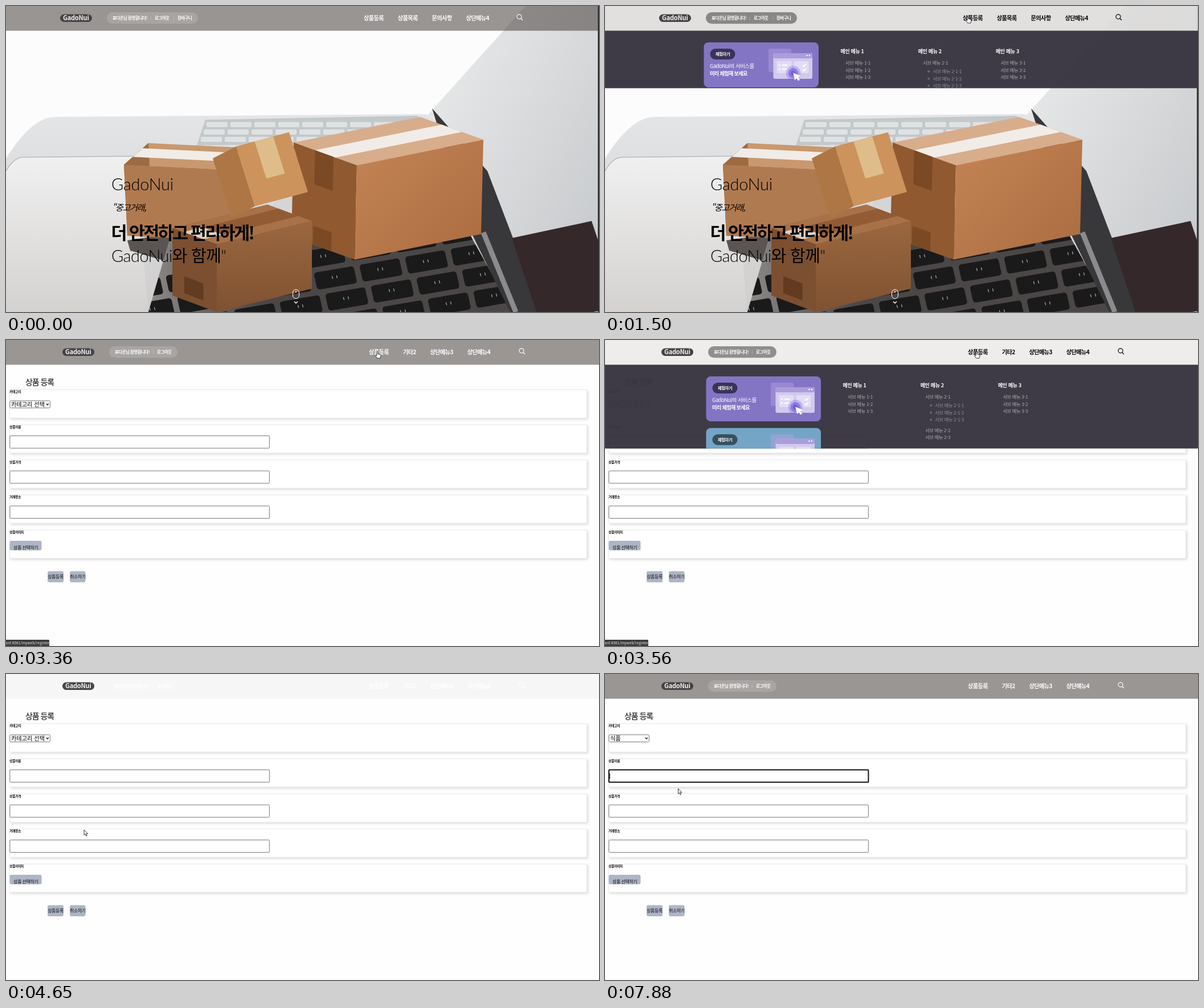
Recreate the animation shown at these times as an HTML page. Size 1041x538 px, loop 8000 ms.

```html
<!DOCTYPE html>
<html lang="ko">
<head>
<meta charset="utf-8">
<title>Shop demo</title>
<style>
  html, body { margin: 0; width: 100%; height: 100%; overflow: hidden; background: #fefefe; }
  svg { display: block; width: 1041px; height: 538px; font-family: "Noto Sans CJK KR", "Noto Sans KR", "Noto Sans CJK", sans-serif; }
  text { white-space: pre; }
  .light { font-family: Lato, "Noto Sans CJK KR", "Noto Sans CJK", sans-serif; }
  .card { filter: drop-shadow(2px 2px 2px rgba(0, 0, 0, .14)); }
  .list { filter: drop-shadow(1px 1px 2px rgba(0, 0, 0, .35)); }
</style>
</head>
<body>
<svg id="stage" viewBox="0 0 1041 538" xmlns="http://www.w3.org/2000/svg"></svg>
<script>
const LOOP = 8000, PAGE_SWAP = 3210;
const BRAND = 'GadoNui', USER = '표다온';

// Drawing helpers
const text = (x, y, s, size, { w = 400, fill = '#000', ls = 0, extra = '' } = {}) =>
  `<text x="${x}" y="${y}" font-size="${size}" font-weight="${w}" fill="${fill}" letter-spacing="${ls}" ${extra}>${s}</text>`;
const rect = (x, y, w, h, fill, r = 0, extra = '') =>
  `<rect x="${x}" y="${y}" width="${w}" height="${h}" rx="${r}" fill="${fill}" ${extra}/>`;
const path = (d, fill, extra = '') => `<path d="${d}" fill="${fill}" ${extra}/>`;
const line = (d, color, width = 1) => path(d, 'none', `stroke="${color}" stroke-width="${width}"`);
const dot = (x, y, r, fill, extra = '') => `<circle cx="${x}" cy="${y}" r="${r}" fill="${fill}" ${extra}/>`;
const each = (n, fn) => Array.from({ length: n }, (_, i) => fn(i)).join('');
const gradient = (id, from, to, dir) =>
  `<linearGradient id="${id}" ${dir}><stop stop-color="${from}"/><stop offset="1" stop-color="${to}"/></linearGradient>`;

// Part of the parallelogram at p spanned by u and v, cut to fractions of both
const facet = ([x, y], u, v, fill, [u0, u1] = [0, 1], [v0, v1] = [0, 1]) => {
  const at = (a, b) => `${x + u[0] * a + v[0] * b} ${y + u[1] * a + v[1] * b}`;
  return path(`M${at(u0, v0)}L${at(u1, v0)}L${at(u1, v1)}L${at(u0, v1)}Z`, fill);
};

// A carton seen from its near top corner, with edges to the left, to the right and down
const carton = (corner, left, right, down, [top, dark, front], tapes) => {
  const face = { top: [left, right], left: [left, down], right: [right, down] };
  return facet(corner, ...face.top, top) + facet(corner, ...face.left, dark) + facet(corner, ...face.right, front)
    + tapes.map(([side, fill, u, v]) => facet(corner, ...face[side], fill, u, v)).join('');
};

const DOWN = 'x1="0" y1="0" x2="0" y2="1"';
const ACROSS = 'x1="0" y1="0" x2="1" y2="1"';
const SIDE = 'x1="0" y1="0" x2=".3" y2="0"';
const PLATE = 'M290 400L250 538H890L805 385L600 360Z';
const TAPE = '#f1ece7', FULL = [0, 1];

const defs = `<defs>
  ${gradient('screen', '#eceded', '#c3c6c9', ACROSS)}
  ${gradient('base', '#e3e5e7', '#cfcdcc', DOWN)}
  ${gradient('corner', '#f0f0f0', '#d4d2d0', DOWN)}
  ${gradient('metal', '#8d8987', '#4b4746', SIDE)}
  ${gradient('bigFront', '#c48455', '#aa6c40', ACROSS)}
  ${gradient('frontSide', '#9a673f', '#805232', DOWN)}
  <clipPath id="plate"><path d="${PLATE}"/></clipPath>
  <clipPath id="dropClip"><rect id="dropRect" x="0" y="43" width="1041" height="0"/></clipPath>
</defs>`;

const keys = each(4, r => each(9, c => {
  const x = 200 + c * 80 + r * 20, y = 488 - c * 14 + r * 37;
  return `<g transform="matrix(1 -.17 .22 1 ${x} ${y})">${rect(0, 0, 70, 30, '#1b1a1b', 5)}
    ${line('M30 11v5M38 11v5', '#c9c7c7')}</g>`;
}));

const photo = `
  ${rect(0, 0, 1041, 538, '#fcfcfc')}
  ${path('M912 0H1041V538H900L738 194Z', 'url(#screen)')}
  ${path('M0 268Q45 196 85 195L738 190L900 538H0Z', 'url(#base)')}
  ${path('M0 290Q14 266 30 266L225 264L250 538H0Z', 'url(#corner)')}
  ${line('M0 290Q14 266 30 266L225 264', '#a3a5a6', 1.2)}
  ${path('M350 200L722 193L760 240L335 245Z', '#c3c8ca')}
  ${each(3, r => each(9, c => rect(352 + c * 42 - r * 5, 204 + r * 13, 37, 9, '#dfe2e3', 2)))}
  ${path('M213 412L295 400L285 450L218 430Z', '#5a5452')}
  ${path(PLATE, 'url(#metal)')}
  <g clip-path="url(#plate)">${keys}</g>
  ${path('M470 330H510V385L470 375Z', '#d5d5d5')}
  ${path('M748 180L845 290L890 408L935 538H885L815 395Z', '#38373a')}
  ${line('M838 398L895 538', '#8b8b8e', 9)}
  ${facet([888, 408], [140, -30], [50, 150], '#34282a')}
  ${carton([207, 279], [43, -38], [185, 9], [6, 125], ['#c9986f', '#9d6a42', '#b07a50'],
    [['top', TAPE, [.36, .76], [0, .95]]])}
  ${carton([616, 280], [-111, -40], [222, -45], [-4, 166], ['#d8ad8c', '#90592f', 'url(#bigFront)'],
    [['top', TAPE, [.34, .66], FULL], ['left', '#7b4924', [.37, .66], [0, .36]], ['left', '#7b4924', [.37, .66], [.8, 1]]])}
  ${carton([370, 419], [-78, -29], [167, -41], [0, 119], ['#a87147', '#7b4f30', 'url(#frontSide)'],
    [['top', '#925b34', [.3, .75], FULL], ['top', '#dcd1c6', [.3, .75], [0, .2]], ['left', '#623b21', [.3, .73], [.65, .9]]])}
  ${carton([404, 247], [-41, 21], [93, -25], [33, 105], ['#c98f58', '#ad7644', '#cd935c'],
    [['right', '#dfbd8b', [.35, .7], [0, .62]]])}`;

const home = `<g id="home">${photo}
  ${text(185, 324, BRAND, 29, { w: 300, ls: -.3, extra: 'class="light"' })}
  ${text(186, 360, '"중고거래,', 15, { w: 300, ls: -1.2, extra: 'font-style="italic"' })}
  ${text(184.5, 410, '더 안전하고 편리하게!', 30.5, { w: 700, ls: -2.6 })}
  ${text(185, 449.5, BRAND + '와 함께"', 29, { w: 300, ls: -.6, extra: 'class="light"' })}
  ${rect(503.5, 498.5, 11, 16, 'none', 5.5, 'stroke="#fff"')}
  <g id="scrollHint">${line('M509 501.5v2', '#fff', 2)}${line('M506 519.5l3 3l3-3', '#fff', 1.5)}</g>
  ${rect(1039, 0, 2, 538, '#2d2d30')}</g>`;

// Registration form
const FIELDS = ['카테고리', '상품이름', '상품가격', '거래장소', '상품이미지'];
const OPTIONS = ['카테고리 선택', '생활용품', '식품', '패션의류잡화', '스포츠/레저', '자동차용품', '도서', '기타'];
const ROW = 61.7, OPTION_H = 19.05, LIST_TOP = 123;
const INPUTS = [1, 2, 3];
const fieldTop = i => 87.5 + i * ROW;
const inputTop = i => fieldTop(i) + 19.2;
const button = (x, y, w, h, label, tx, ty) =>
  rect(x, y, w, h, '#aeb5c6', 3) + text(tx, ty, label, 8, { ls: -.45, fill: '#111' });

const form = `<g id="form">${rect(0, 0, 1041, 538, '#fefefe')}
  ${text(34, 78.8, '상품 등록', 14, { w: 500, ls: -1.1 })}
  ${FIELDS.map((label, i) => rect(6.5, fieldTop(i), 1013, 49.5, '#fff', 0, 'class="card" stroke="#ececec"')
    + text(6.3, fieldTop(i) + 5.8, label, 5.6, { w: 700, ls: -.2 })).join('')}
  ${INPUTS.map(i => rect(6.8, inputTop(i), 455.6, 21.8, '#fff', 1.5, `id="input${i}" stroke="#767676"`)).join('')}
  ${rect(7.8, 175, 1, 9.5, '#000', 0, 'id="caret"')}
  ${rect(6.8, 106.8, 70.6, 12.6, '#fff', 2, 'stroke="#767676"')}
  ${text(9, 116.6, OPTIONS[0], 10.2, { extra: 'id="choice"' })}
  ${line('M70.8 112l2 2.2l2-2.2', '#000', 1.2)}
  ${button(6.5, 353, 56, 16.8, '상품 선택하기', 13, 367.5)}
  ${button(73, 406.5, 28, 19.5, '상품등록', 73.2, 419.3)}
  ${button(112, 406.5, 27.5, 19.5, '취소하기', 112, 419.3)}</g>`;

const list = `<g id="list">
  ${rect(6.8, 122.4, 70.6, OPTIONS.length * OPTION_H, '#fff', 0, 'class="list" stroke="#6b6b6b"')}
  ${rect(7.2, LIST_TOP, 69.8, OPTION_H, '#6b6b6b', 0, 'id="mark"')}
  ${OPTIONS.map((s, i) => text(9.5, LIST_TOP + i * OPTION_H + 13.3, s, 10.2, { extra: 'class="option"' })).join('')}</g>`;

// Mega menu
const promo = (y, fill, pill) => `<g transform="translate(0 ${y})">
  ${rect(173.5, 0, 201.5, 79, fill, 8)}
  ${rect(184.5, 11, 44, 19, pill, 9.5)}
  ${text(194, 23.3, '체험하기', 7.4, { w: 700, fill: '#fff', ls: -.5 })}
  ${text(184, 45, BRAND + '의 서비스를', 9.4, { fill: '#fff', ls: -.5 })}
  ${text(184, 58, '미리 체험해 보세요', 9.2, { w: 700, fill: '#fff', ls: -.7 })}
  ${rect(287, 11, 40, 41, '#b3a0e0', 3, 'opacity=".45"')}
  ${rect(295.5, 19, 68.5, 45, '#d2caee', 3)}
  ${rect(295.5, 19, 68.5, 9, '#ab9cdb', 3)}
  ${dot(354.5, 23, 1.3, '#fff')}${dot(359, 23, 1.3, '#fff')}
  ${rect(301.5, 33, 26, 21, '#e2dcf5', 2)}${rect(331.5, 33, 26, 21, '#e2dcf5', 2)}
  ${line('M305 40h3m3 0h9M305 47h3m3 0h9M347 40l2 2l4-4M347 48l2 2l4-4', '#fff', 2)}
  ${[13, 9, 4.5].map((r, i) => dot(330.5, 54, r, '#7459de', `opacity="${.3 + i * .3}"`)).join('')}
  ${path('M330.5 53.5l13 5.5l-4.5 2.3l3 4.5l-2.8 1.8l-3-4.5l-3.2 3.5z', '#fff')}</g>`;

const COL = 136.2, SUB = 12.6;
const subItem = (x, y, id, fill = '#adabb2') => text(x, y, '서브 메뉴 ' + id, 8.2, { fill, ls: -.3 });
const nested = (x, y) => each(3, i =>
  dot(x + 18.5, y + i * SUB - 3, 1.3, 'none', 'stroke="#8f8d96"') + subItem(x + 25.5, y + i * SUB, `2-1-${i + 1}`, '#8f8d96'));
const column = (n, i) => {
  const x = 413.5 + i % 3 * COL, y = 83 + Math.floor(i / 3) * 130.8;
  const gap = j => n === 2 && j > 0 ? 46 : 0;
  return text(x, y, '메인 메뉴 ' + n, 9, { w: 700, fill: '#fff', ls: -.35 })
    + each(3, j => subItem(x + 8.5, y + 20 + j * SUB + gap(j), `${n}-${j + 1}`))
    + (n === 2 ? nested(x, y + 35) : '');
};

const drop = `<g id="drop" clip-path="url(#dropClip)">${rect(0, 43, 1041, 269.4, '#383540', 0, 'opacity=".97"')}
  <g id="dropBody">${promo(64, '#8475c4', '#3a3359')}${promo(154.7, '#74a5c7', '#36505f')}
  ${[1, 2, 3, 4, 5, 7].map(column).join('')}</g></g>`;

// Header: one set of links for each page
const links = (id, dx, menuX, menu, account) => {
  const small = (x, s) => text(x, 24, s, 7.5, { w: 700, fill: '#fff', ls: -.55 });
  const flow = menu.map((s, i) => `<tspan dx="${i ? 24.7 : 0}">${s}</tspan>`).join('');
  return `<g id="${id}"><g transform="translate(${dx} 0)">
  ${rect(95, 14.5, 56, 13.5, '#474344', 6.7)}
  ${text(100, 25.2, BRAND, 11, { w: 700, fill: '#f3f3f3', ls: -.2 })}
  ${rect(177, 11, 80 + account.length * 40, 20.2, '#fff', 10.1, 'class="pill"')}
  ${small(187, USER + '님 환영합니다!')}
  ${account.map((s, i) => rect(254 + i * 40, 18, 1, 7, '#fff', 0, 'opacity=".2"') + small(261 + i * 40, s)).join('')}
  <g class="ink">${text(menuX - dx, 24.5, flow, 10.2, { w: 700, fill: 'currentColor', ls: -.6 })}
  ${dot(901, 18.8, 4, 'none', 'stroke="currentColor" stroke-width="1.2"')}${line('M904 22l3 3', 'currentColor', 1.3)}</g></g></g>`;
};
const header = rect(0, 0, 1041, 43.5, '#fff', 0, 'id="bar"')
  + links('homeLinks', 0, 628, ['상품등록', '상품목록', '문의사항', '상단메뉴4'], ['로그아웃', '장바구니'])
  + links('formLinks', 4, 637, ['상품등록', '기타2', '상단메뉴3', '상단메뉴4'], ['로그아웃']);

const status = `<g id="status">${rect(-3, 527, 79, 14, '#3c3c3c', 1.5)}
  ${text(-.5, 535.3, 'ost:8081/myweb/register', 6.6, { fill: '#e8e8e8' })}</g>`;

const OUTLINE = 'stroke="#222" stroke-width=".9" stroke-linejoin="round"';
const pointers = `<g id="pointer">
  ${path('M0 0V9.2L2.2 7.3L3.7 10.8L5.2 10.2L3.7 6.8H6.5Z', '#fff', `id="arrow" ${OUTLINE}`)}
  ${path('M-1 1Q0-.6 1 1V5L5 6Q6 6.4 6 8L5 12.5H-.5L-3.5 8Q-3.5 6.5-1 8Z', '#fff', `id="hand" ${OUTLINE}`)}
  ${path('M-1.5-4.5h3m-1.5 0v9m-1.5 0h3', 'none', `id="beam" ${OUTLINE}`)}</g>`;

document.getElementById('stage').innerHTML = defs + home + form + drop + header + list + status + pointers;
const $ = id => document.getElementById(id);
const all = sel => [...document.querySelectorAll(sel)];
const show = (id, on) => $(id).setAttribute('display', on ? 'inline' : 'none');
const set = (el, attrs) => Object.entries(attrs).forEach(([k, v]) => el.setAttribute(k, v));

// Timing
const ramp = (t, from, length) => Math.min(1, Math.max(0, (t - from) / length));
const swing = p => .5 - Math.cos(Math.PI * p) / 2;
// CSS "ease", solved by bisection
const ease = p => {
  const bez = (u, a, b) => 3 * u * (1 - u) ** 2 * a + 3 * u * u * (1 - u) * b + u ** 3;
  let lo = 0, hi = 1;
  for (let i = 0; i < 20; i++) {
    const mid = (lo + hi) / 2;
    if (bez(mid, .25, .25) < p) lo = mid; else hi = mid;
  }
  return bez(lo, .1, 1);
};

const OPEN_HOME = 1417, OPEN_FORM = 3455, SHUT = 4415, FADE = 4633, SLIDE = 200;
const LIST_OPEN = 5390, PICK = 6470, FOCUS = 6880;

// Each move glides from the last resting place to a new one
const MOVES = [
  { from: 0, to: 870, x: 690, y: 158 },
  { from: 900, to: 1400, x: 637, y: 17.5 },
  { from: 1780, to: 2510, x: 652, y: 19.5 },
  { from: 4040, to: 4650, x: 137, y: 274 },
  { from: 4800, to: LIST_OPEN, x: 46, y: 114 },
  { from: 5800, to: 5980, x: 48, y: 184 },
  { from: 6170, to: 6250, x: 48, y: 173 },
  { from: PICK, to: FOCUS, x: 112, y: 177 },
  { from: 7000, to: 7480, x: 128.5, y: 201.5 }
];
const pointerAt = t => MOVES.reduce(([x, y], m) => {
  const k = swing(ramp(t, m.from, m.to - m.from));
  return [x + (m.x - x) * k, y + (m.y - y) * k];
}, [1060, 560]);

function drawHeader(t, opened) {
  const lit = t >= opened && t < FADE;
  const k = t < FADE ? ease(ramp(t, opened, SLIDE)) : 1 - ease(ramp(t, FADE, SLIDE));
  // Colours mix with premultiplied alpha
  const alpha = .5 + .5 * k;
  const rgb = [57, 48, 44].map(c => Math.round((c * .5 * (1 - k) + 255 * k) / alpha));
  set($('bar'), { fill: `rgb(${rgb})`, 'fill-opacity': alpha });
  all('.ink').forEach(el => { el.style.color = lit ? '#000' : '#fff'; });
  all('.pill').forEach(el => set(el, { fill: lit ? '#000' : '#fff', 'fill-opacity': lit ? .4 : .14 }));
}

function drawDrop(t, opened, onForm) {
  const slide = swing(ramp(t, opened, SLIDE)) - (onForm ? swing(ramp(t, SHUT, SLIDE)) : 0);
  show('drop', slide > 0);
  set($('dropRect'), { height: .5 + 269 * slide });
  set($('dropBody'), { transform: `translate(${onForm ? 4 : 0} 0)` });
}

function drawForm(t, y) {
  const active = Math.max(0, Math.floor((y - LIST_TOP) / OPTION_H));
  show('list', t >= LIST_OPEN && t < PICK);
  set($('mark'), { y: LIST_TOP + active * OPTION_H });
  all('.option').forEach((el, i) => set(el, { fill: i === active ? '#fff' : '#000' }));
  $('choice').textContent = OPTIONS[t < PICK ? 0 : 2];

  const focused = t >= FOCUS;
  set($('input1'), { stroke: focused ? '#101010' : '#767676', 'stroke-width': focused ? 2 : 1 });
  show('caret', focused && Math.floor((t - FOCUS) / 500) % 2 === 0);
}

function drawPointer(t, x, y) {
  const overLink = t < SHUT && y < 36 && x > 625 && x < 672;
  const free = t > FADE && (t < LIST_OPEN || t >= PICK);
  const overInput = free && INPUTS.some(i => y > inputTop(i) && y < inputTop(i) + 22);
  show('hand', overLink);
  show('beam', overInput);
  show('arrow', !overLink && !overInput);
  set($('pointer'), { transform: `translate(${x} ${y})` });
}

function draw(t) {
  const onForm = t >= PAGE_SWAP;
  const opened = onForm ? OPEN_FORM : OPEN_HOME;
  const [x, y] = pointerAt(t);
  ['home', 'homeLinks'].forEach(id => show(id, !onForm));
  ['form', 'formLinks'].forEach(id => show(id, onForm));
  show('status', t >= 2800 && t < 4180);
  set($('scrollHint'), { transform: `translate(0 ${5 * swing(t / 750)})` });
  drawHeader(t, opened);
  drawDrop(t, opened, onForm);
  drawForm(t, y);
  drawPointer(t, x, y);
}

const start = performance.now();
function tick() {
  draw((performance.now() - start) % LOOP);
  requestAnimationFrame(tick);
}
tick();
</script>
</body>
</html>
```
